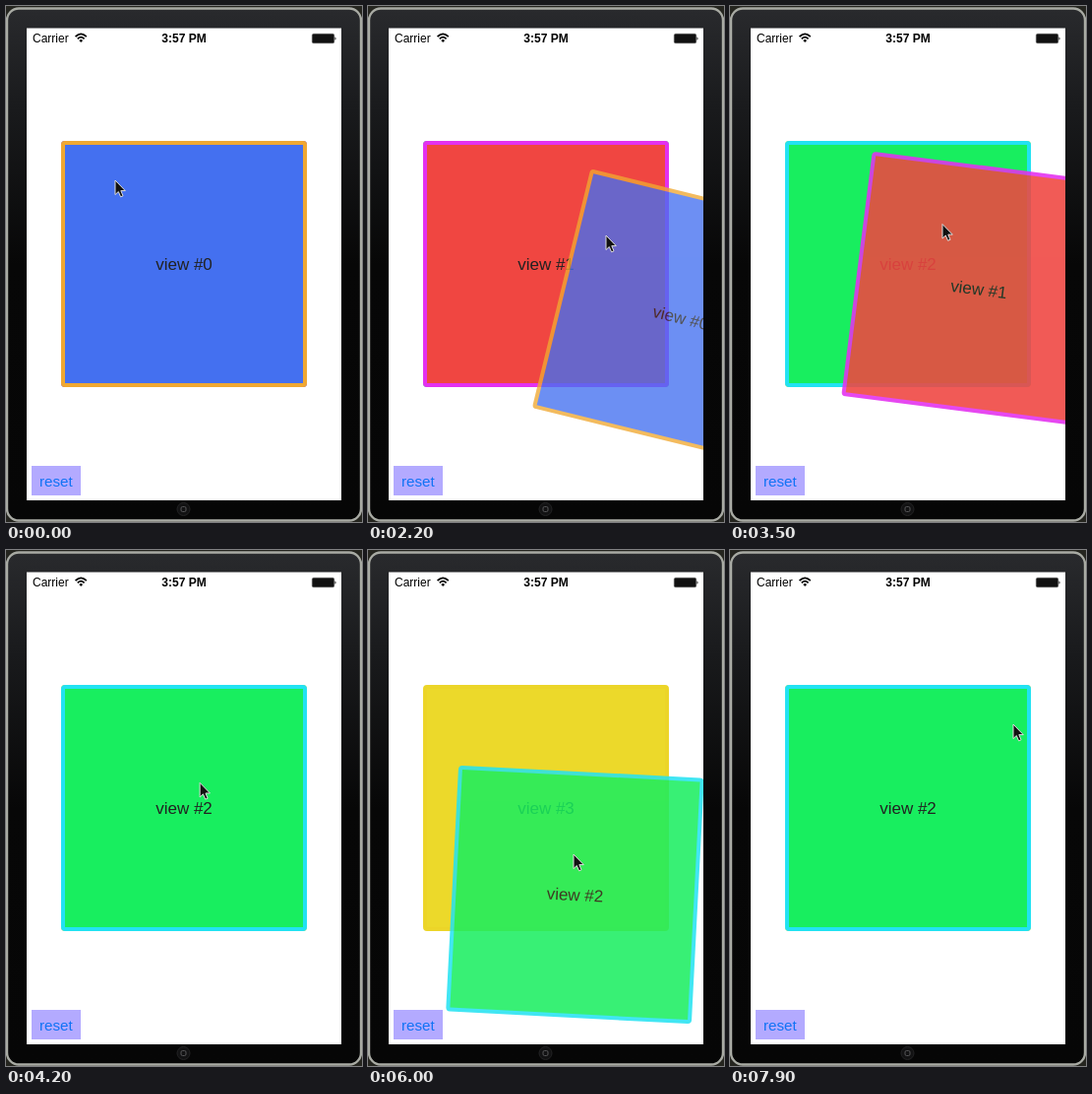
Animation of 362x524 px, one loop 8 s. Source, as an HTML page:

```html
<!DOCTYPE html>
<html lang="en">
<head>
<meta charset="utf-8">
<title>Swipe cards</title>
<style>
  html, body { margin: 0; width: 100%; height: 100%; overflow: hidden; background: #000; }
  svg { display: block; width: 362px; height: 524px; font-family: "Liberation Sans", Arial, sans-serif; }
</style>
</head>
<body>
<svg viewBox="0 0 362 524">
  <defs>
    <linearGradient id="body" x2="0" y2="1">
      <stop offset="0" stop-color="#292a2d"/>
      <stop offset=".2" stop-color="#191a1c"/>
      <stop offset=".5" stop-color="#070707"/>
      <stop offset="1" stop-color="#060606"/>
    </linearGradient>
    <clipPath id="screen"><rect x="21" y="22.5" width="320" height="479.5"/></clipPath>
  </defs>

  <rect width="362" height="524" fill="#25251f"/>
  <rect x="1" y="2.5" width="360" height="520" rx="12" fill="url(#body)" stroke="#a9aba4" stroke-width="2.4"/>
  <circle cx="180.5" cy="511" r="6.5" fill="#121213" stroke="#232324"/>
  <rect x="178" y="508.5" width="5" height="5" rx="1.5" fill="none" stroke="#555557"/>

  <g clip-path="url(#screen)">
    <rect x="21" y="22" width="320" height="480" fill="#fff"/>
    <rect x="26" y="467" width="50" height="30" fill="#b3aaff"/>
    <text x="34" y="488" font-size="15.2" fill="#1173f5">reset</text>
    <g id="cards"></g>
    <g font-size="12">
      <text x="27" y="37">Carrier</text>
      <text x="181" y="37" text-anchor="middle" font-weight="bold">3:57 PM</text>
    </g>
    <g fill="none" stroke="#000" stroke-width="1.7">
      <path d="M70.6 31.2Q76.2 25.6 81.8 31.2M72.8 33.4Q76.2 30 79.6 33.4"/>
      <path d="M74.3 35Q76.2 33.2 78.1 35L76.2 37Z" fill="#000" stroke="none"/>
    </g>
    <rect x="311.3" y="28.3" width="22.4" height="9.4" rx="1.5" fill="#111" stroke="#555" stroke-width=".6"/>
    <path d="M334.5 31.2Q336.5 33 334.5 34.8Z"/>
  </g>

  <path id="pointer" d="M0 0V14.6L3.3 11.5 5.6 16.8 8 15.8 5.8 10.6H10.3Z" fill="#111" stroke="#ddd" stroke-width="1"/>
</svg>

<script>
const LOOP = 8000, STEP = 100;
const CENTER = [181, 262];
const TILT = 0.1005;   // degrees per pixel of sideways drag
const FADE = 0.0015;   // opacity lost per pixel of drag

// route: card offsets as [time, dx, dy]; grab: pointer position for zero offset
const cards = [
  { fill: '#4470f0', edge: '#f0a832', from: 1400, to: 2400, grab: [[0, 105, 178.5]],
    route: [[1400, 0, 0], [2200, 137, 54.5], [2400, 180, 62], [2700, 480, 70]] },
  { fill: '#f04641', edge: '#e331f0', from: 3100, to: 3700, grab: [[0, 144, 196]],
    route: [[3100, 0, 0], [3500, 72, 25.5], [3700, 130, 45], [4000, 480, 90]] },
  { fill: '#18ee5f', edge: '#22e2f2', from: 4300, to: 7400,
    grab: [[5100, 190, 236], [6000, 179.5, 221], [7000, 199.5, 209.5]],
    route: [[4300, 0, 0], [5100, -48, 35.5], [5600, -5, 98], [6000, 29.5, 88],
            [6550, 10, -90], [7000, -28.5, -31.5], [7400, -31, 85], [7600, 0, 0]] },
  { fill: '#ecd92a', edge: '#ecd528', route: [[0, 0, 0]] }
];

const slope = (a, b, k) => (b[k] - a[k]) / (b[0] - a[0]);

// Tangent that never overshoots the neighbouring keys
function tangent(path, i, k) {
  if (i === 0 || i === path.length - 1) return 0;
  const a = slope(path[i - 1], path[i], k), b = slope(path[i], path[i + 1], k);
  return a * b > 0 ? 2 * a * b / (a + b) : 0;
}

function at(path, t) {
  const last = path.length - 1;
  if (t <= path[0][0]) return path[0].slice(1);
  if (t >= path[last][0]) return path[last].slice(1);
  const i = path.findIndex(p => p[0] > t) - 1;
  const a = path[i], b = path[i + 1], h = b[0] - a[0], u = (t - a[0]) / h;
  return [1, 2].map(k => {
    const s = u * u * (3 - 2 * u);
    return a[k] + (b[k] - a[k]) * s
      + h * u * (1 - u) * ((1 - u) * tangent(path, i, k) - u * tangent(path, i + 1, k));
  });
}

function holding(card, t) {
  const [dx, dy] = at(card.route, t), [x, y] = at(card.grab, t);
  return [x + dx, y + dy];
}

// Free pointer travel joins the start and end of every drag
const drags = cards.filter(c => c.grab);
const rest = holding(drags[2], drags[2].to);
const travel = [
  [0, 111, 177], [600, 111, 177], [900, 91, 177],
  ...drags.flatMap(c => [c.from, c.to].map(t => [t, ...holding(c, t)])),
  [7600, ...rest], [7900, 288, 177]
];

function pointerAt(t) {
  const card = drags.find(c => t >= c.from && t <= c.to);
  return card ? holding(card, t) : at(travel, t);
}

const layer = document.getElementById('cards');
const pointer = document.getElementById('pointer');

cards.forEach((card, i) => {
  card.node = document.createElementNS('http://www.w3.org/2000/svg', 'g');
  card.node.innerHTML =
    `<rect x="-123" y="-123" width="246" height="246" rx="2" fill="${card.fill}" stroke="${card.edge}" stroke-width="4"/>
     <text y="6" text-anchor="middle" font-size="17" fill="#222">view #${i}</text>`;
  layer.prepend(card.node);
});

function draw(t) {
  for (const card of cards) {
    const [dx, dy] = at(card.route, t);
    card.node.setAttribute('transform',
      `translate(${CENTER[0] + dx} ${CENTER[1] + dy}) rotate(${dx * TILT})`);
    card.node.setAttribute('opacity', Math.max(0, 1 - Math.hypot(dx, dy) * FADE));
  }
  pointer.setAttribute('transform', `translate(${pointerAt(t)})`);
}

const start = performance.now();
function tick() {
  const t = (performance.now() - start) % LOOP;
  draw(Math.floor(t / STEP) * STEP);
  requestAnimationFrame(tick);
}
tick();
</script>
</body>
</html>
```
